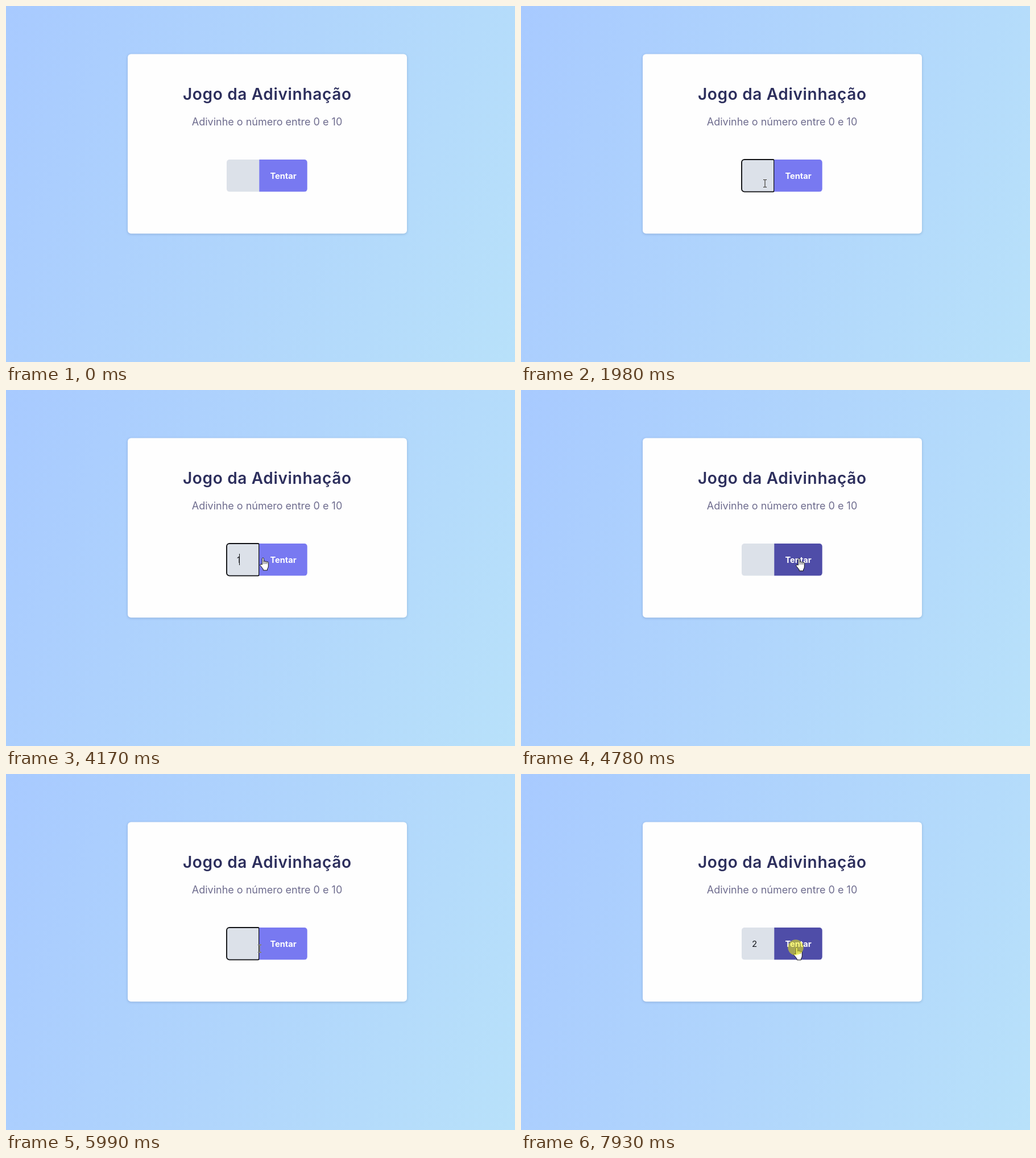
Recreate the animation shown at these times as an HTML page. Size 895x626 px, loop 8 s.

```html
<!DOCTYPE html>
<html lang="pt-BR">
<head>
<meta charset="utf-8">
<title>Jogo da Adivinhação</title>
<style>
  html, body { margin: 0; width: 100%; height: 100%; overflow: hidden; }
  body { background: linear-gradient(110deg, #a8caff, #b0d5fc 50%, #b8e1fa); }
  svg { display: block; width: 100%; height: 100%; }
  text { font-family: Inter, "Open Sans", sans-serif; }
  .card { fill: #fefefe; filter: drop-shadow(0 1.5px 2px rgba(30, 60, 110, .24)); }
  .title { font-size: 28px; font-weight: 600; letter-spacing: .67px; fill: #2d2f5d; }
  .hint { font-size: 18px; fill: #6e6c8e; }
  .label { font-size: 14.6px; font-weight: 700; fill: #fff; }
  .digit { font-size: 15px; fill: #15171c; }
  .beam { fill: none; stroke: #fff; mix-blend-mode: difference; }
</style>
</head>
<body>
<svg viewBox="0 0 895 626">
  <rect class="card" x="214" y="84.5" width="491" height="315.7" rx="6"/>
  <text class="title" x="459.3" y="165" text-anchor="middle">Jogo da Adivinhação</text>
  <text class="hint" x="459" y="209.5" text-anchor="middle">Adivinhe o número entre 0 e 10</text>

  <path d="M446 270H393a5 5 0 0 0-5 5v46.6a5 5 0 0 0 5 5h53z" fill="#dce1e9"/>
  <path id="outline" d="M443 270H393a5 5 0 0 0-5 5v46.6a5 5 0 0 0 5 5h50q2 0 2-2V272q0-2-2-2z"
        fill="none" stroke="#101114" stroke-width="1.9"/>
  <path id="button" d="M445.3 270h79.4a5 5 0 0 1 5 5v46.6a5 5 0 0 1-5 5h-79.4z"/>
  <text class="label" x="487.5" y="304" text-anchor="middle">Tentar</text>
  <text class="digit" id="digit" x="406" y="304"></text>
  <rect id="caret" y="288" width="1" height="20" fill="#101114"/>

  <path id="arrow" d="M.5.5v16.2l3.7-3.5 2.4 5.5 2.5-1.1-2.4-5.3h5.1z"
        fill="#fff" stroke="#111" stroke-width=".9"/>
  <g id="hand" stroke="#111" stroke-linejoin="round">
    <path fill="#fff" d="M.4 12V1.6a1.4 1.4 0 0 1 2.8 0V7a1.4 1.4 0 0 1 2.8.3a1.4 1.4 0 0 1 2.7.7a1.3 1.3 0 0 1 2.6.9V15q0 2.5-1.8 4.5V22H2.2V20L-3 13.5q-.7-2 1-2.4z"/>
    <path fill="none" stroke-width=".8" d="M3.2 7v4M6 7.5V11M8.7 8v3"/>
  </g>
  <path id="beam" class="beam" d="M-1-5.5h2.5l.5.5.5-.5H5M2-5V7M-1 7.5h2.5L2 7l.5.5H5"/>
  <circle id="click" r="13.7" fill="#ff0" fill-opacity=".5"/>
</svg>
<script>
  const LOOP = 8000, FADE = 300, BLINK = 530, PRESS = 200, INPUT_EDGE = 445;
  const el = Object.fromEntries([...document.querySelectorAll('[id]')].map(e => [e.id, e]));

  // Each glide runs in visible steps along a curve towards `to`, drawn to `bend`.
  const home = [799, 595];
  const glides = [
    { start: 380, end: 1120, steps: 11, bend: [613, 453], to: [427, 311] },
    { start: 4030, end: 4580, steps: 8, bend: [466, 278], to: [487, 296] },
    { start: 5110, end: 5390, steps: 4, bend: [466, 301], to: [444, 306] },
    { start: 7590, end: 7930, steps: 5, bend: [464, 306], to: [483, 305] }
  ];
  const clicks = [
    { at: 1450, on: 'input' }, { at: 4580, on: 'button' },
    { at: 5460, on: 'input' }, { at: 7930, on: 'button' }
  ];
  const keys = [{ at: 2970, char: '1', width: 3 }, { at: 6990, char: '2', width: 8 }];

  const latest = (events, t) => events.filter(e => e.at <= t).pop();
  const show = (node, on) => { node.style.display = on ? '' : 'none'; };
  const ease = v => v * v * (3 - 2 * v);

  function pointerAt(t) {
    let from = home;
    for (const { start, end, steps, bend, to } of glides) {
      if (t < start) break;
      const step = Math.floor((t - start) / (end - start) * steps) + 1;
      const k = ease(Math.min(1, step / steps)), a = from;
      from = a.map((v, i) =>
        Math.round(v * (1 - k) ** 2 + 2 * bend[i] * k * (1 - k) + to[i] * k * k));
    }
    return from;
  }

  function targetAt(t) {
    const [x, y] = pointerAt(t);
    if (x < 388 || x >= 530 || y < 270 || y >= 327) return 'page';
    return x < INPUT_EDGE ? 'input' : 'button';
  }

  // The fade equals the share of the last FADE ms spent over the button.
  function buttonColor(t) {
    const samples = 30;
    let over = 0;
    for (let i = 0; i < samples; i++) over += targetAt(t - i * FADE / samples) === 'button';
    const k = ease(over / samples), light = [120, 121, 241], dark = [79, 77, 168];
    return `rgb(${light.map((c, i) => Math.round(c + (dark[i] - c) * k))})`;
  }

  function draw(t) {
    const visible = t >= glides[0].start, target = targetAt(t);
    const spot = `translate(${pointerAt(t).join(' ')})`;
    const cursors = { arrow: 'page', hand: 'button', beam: 'input' };
    for (const name in cursors) {
      show(el[name], visible && target === cursors[name]);
      el[name].setAttribute('transform', spot);
    }
    el.button.setAttribute('fill', buttonColor(t));

    const click = latest(clicks, t);
    show(el.click, click && t < click.at + PRESS);
    el.click.setAttribute('transform', spot);

    // Submitting clears the typed digit once the press ends.
    const submit = latest(clicks.filter(c => c.on === 'button'), t - PRESS);
    const key = latest(keys, t);
    const typed = key && !(submit && submit.at > key.at) ? key : null;
    el.digit.textContent = typed ? typed.char : '';

    const focused = click && click.on === 'input';
    show(el.outline, focused);
    const since = focused ? t - Math.max(click.at, typed ? typed.at : 0) : 0;
    show(el.caret, focused && Math.floor(since / BLINK) % 2 === 0);
    el.caret.setAttribute('x', 407 + (typed ? typed.width : 0));
  }

  const begin = performance.now();
  function tick() {
    draw((performance.now() - begin) % LOOP);
    requestAnimationFrame(tick);
  }
  tick();
</script>
</body>
</html>
```
